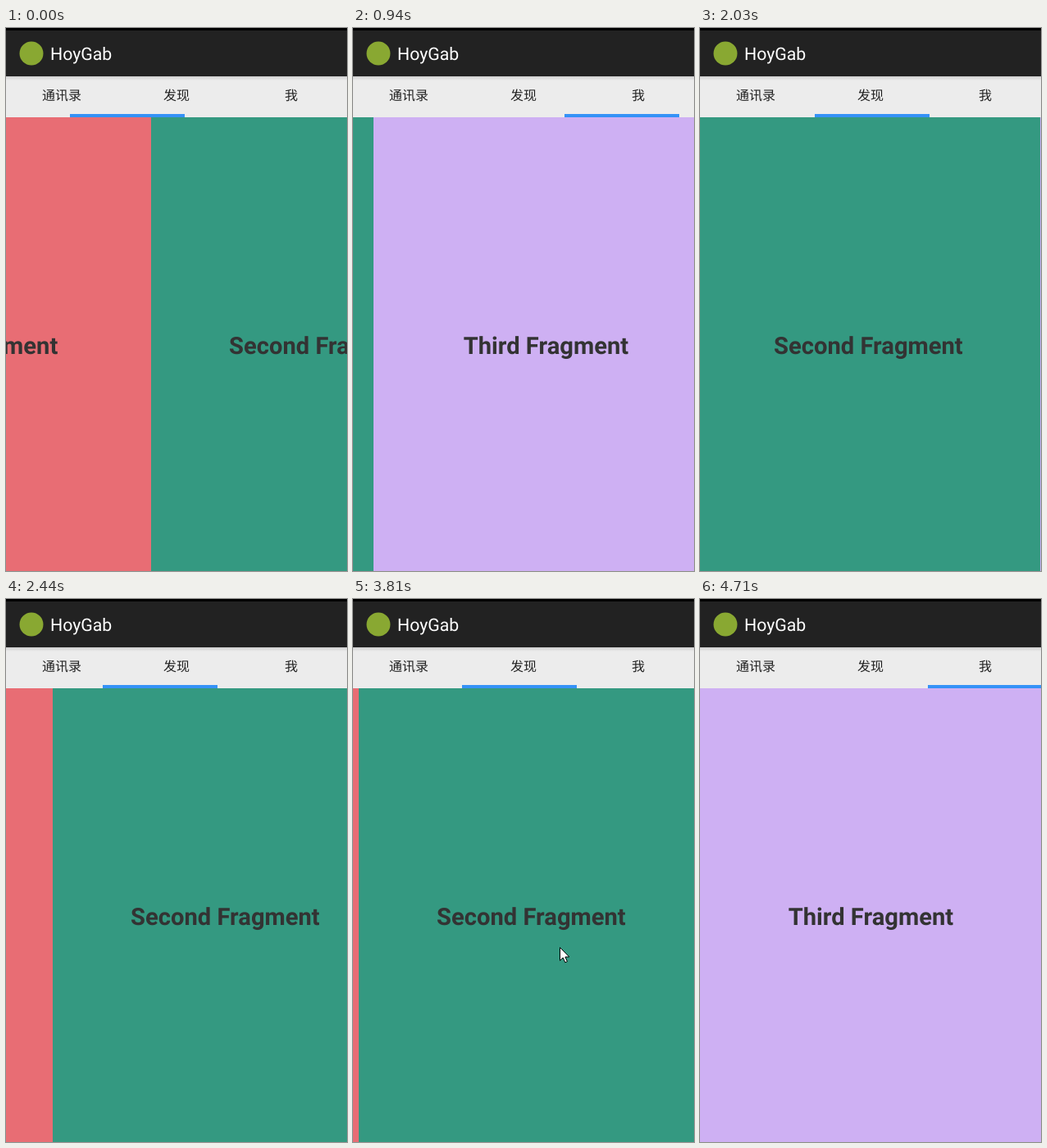
An HTML page that plays this animation: 416x663 px, repeating every 5430 ms.

```html
<!DOCTYPE html>
<html lang="zh">
<head>
<meta charset="utf-8">
<title>Swipe tabs</title>
<style>
  html, body { margin: 0; width: 100%; height: 100%; overflow: hidden; background: #000; }
  svg { display: block; width: 416px; height: 663px; }
  text { font-family: Roboto, sans-serif; text-rendering: geometricPrecision; }
  .tabs text { font: 16px "Noto Sans CJK SC", "Noto Sans CJK", sans-serif; fill: #222; text-anchor: middle; }
  .page text { font-size: 29.15px; font-weight: 700; fill: #333; text-anchor: middle; }
</style>
</head>
<body>
<svg viewBox="0 0 416 663">
  <defs>
    <linearGradient id="shade" x2="0" y2="1">
      <stop stop-color="#cfcfcf"/>
      <stop offset="1" stop-color="#ececec"/>
    </linearGradient>
  </defs>
  <g class="page"><rect y="109" width="420" height="554" fill="#e86d74"/><text x="210.4" y="398">First Fragment</text></g>
  <g class="page"><rect y="109" width="420" height="554" fill="#349981"/><text x="210.4" y="398">Second Fragment</text></g>
  <g class="page"><rect y="109" width="420" height="554" fill="#ceb0f3"/><text x="210.4" y="398">Third Fragment</text></g>
  <rect width="416" height="59" fill="#222"/>
  <rect width="416" height="3" fill="#000"/>
  <circle cx="31" cy="31" r="14.5" fill="#89a832"/>
  <text x="54" y="39" font-size="21.3" fill="#fff">HoyGab</text>
  <g class="tabs">
    <rect y="59" width="416" height="50" fill="#ececec"/>
    <rect y="59" width="416" height="5" fill="url(#shade)"/>
    <text x="68" y="88">通讯录</text>
    <text x="208" y="88">发现</text>
    <text x="348" y="88">我</text>
    <rect id="bar" y="105" width="140" height="4" fill="#3592f7"/>
  </g>
  <path id="cursor" d="M.5 .5V16.5L4.2 13L6.8 18.8L9.4 17.6L6.9 12H11.8Z" fill="#fff" stroke="#000"/>
</svg>
<script>
const LOOP = 5430, PAGE = 420, TAB = 140, EDGE = -2, LAG = 30;

// Each swipe drags linearly by a share of a page, then settles on the next one.
const swipes = [
  { press: 0, release: 30, drag: .574, from: 0, to: 1, settle: 400 },
  { press: 715, release: 822, drag: .19, from: 1, to: 2, settle: 300 },
  { press: 1725, release: 1810, drag: .279, from: 2, to: 1, settle: 360 },
  { press: 2340, release: 2470, drag: .18, from: 1, to: 0, settle: 410 },
  { press: 3440, release: 3592, drag: .41, from: 0, to: 1, settle: 450 },
  { press: 3990, release: 4080, drag: .2, from: 1, to: 2, settle: 310 }
];

// The pointer's visits to the stage: key points of time, x, y.
const visits = [
  [[400, -20, 430], [690, 190, 430], [880, -20, 430]],
  [[1190, 66, 433], [1710, 231, 411], [1770, 350, 426], [1810, 425, 430]],
  [[2130, 440, 430], [2340, 335, 430], [2440, 415, 432], [2470, 439, 432]],
  [[2890, 251, 494], [3000, 310, 462], [3210, 310, 462], [3440, 350, 432],
    [3680, 175, 425], [3810, 252, 425], [3970, 330, 428], [4180, 190, 434], [4700, 284, 663]]
];

const pages = document.querySelectorAll(".page");
const bar = document.getElementById("bar");
const cursor = document.getElementById("cursor");
const mix = (a, b, u) => a + (b - a) * u;
const clamp = u => Math.min(1, Math.max(0, u));
const quintOut = u => 1 - (1 - u) ** 5;
const move = (el, x, y) => el.setAttribute("transform", `translate(${Math.round(x)} ${Math.round(y)})`);

function scroll(s, t) {
  const dragged = s.press ? s.drag * clamp((t - s.press) / (s.release - s.press)) : s.drag;
  const done = quintOut(clamp((t - s.release) / s.settle));
  return mix(s.from, s.to, mix(dragged, 1, done));
}

function drawPointer(t) {
  const visit = visits.find(v => t >= v[0][0] && t < v.at(-1)[0]);
  cursor.style.display = visit ? "" : "none";
  if (!visit) return;
  const i = visit.findIndex(k => k[0] > t);
  const [t0, x0, y0] = visit[i - 1], [t1, x1, y1] = visit[i];
  const u = (t - t0) / (t1 - t0);
  move(cursor, mix(x0, x1, u), mix(y0, y1, u));
}

function draw(t) {
  const s = swipes.findLast(k => k.press <= t);
  const p = scroll(s, t);
  // The tab bar trails the pages by one refresh once they are let go.
  const trail = t < s.release ? p : scroll(s, Math.max(s.release, t - LAG));
  pages.forEach((el, i) => move(el, EDGE + PAGE * (i - p), 0));
  move(bar, EDGE + TAB * trail, 0);
  drawPointer(t);
}

const start = performance.now();
function loop() {
  draw((performance.now() - start) % LOOP);
  requestAnimationFrame(loop);
}
loop();
</script>
</body>
</html>
```
